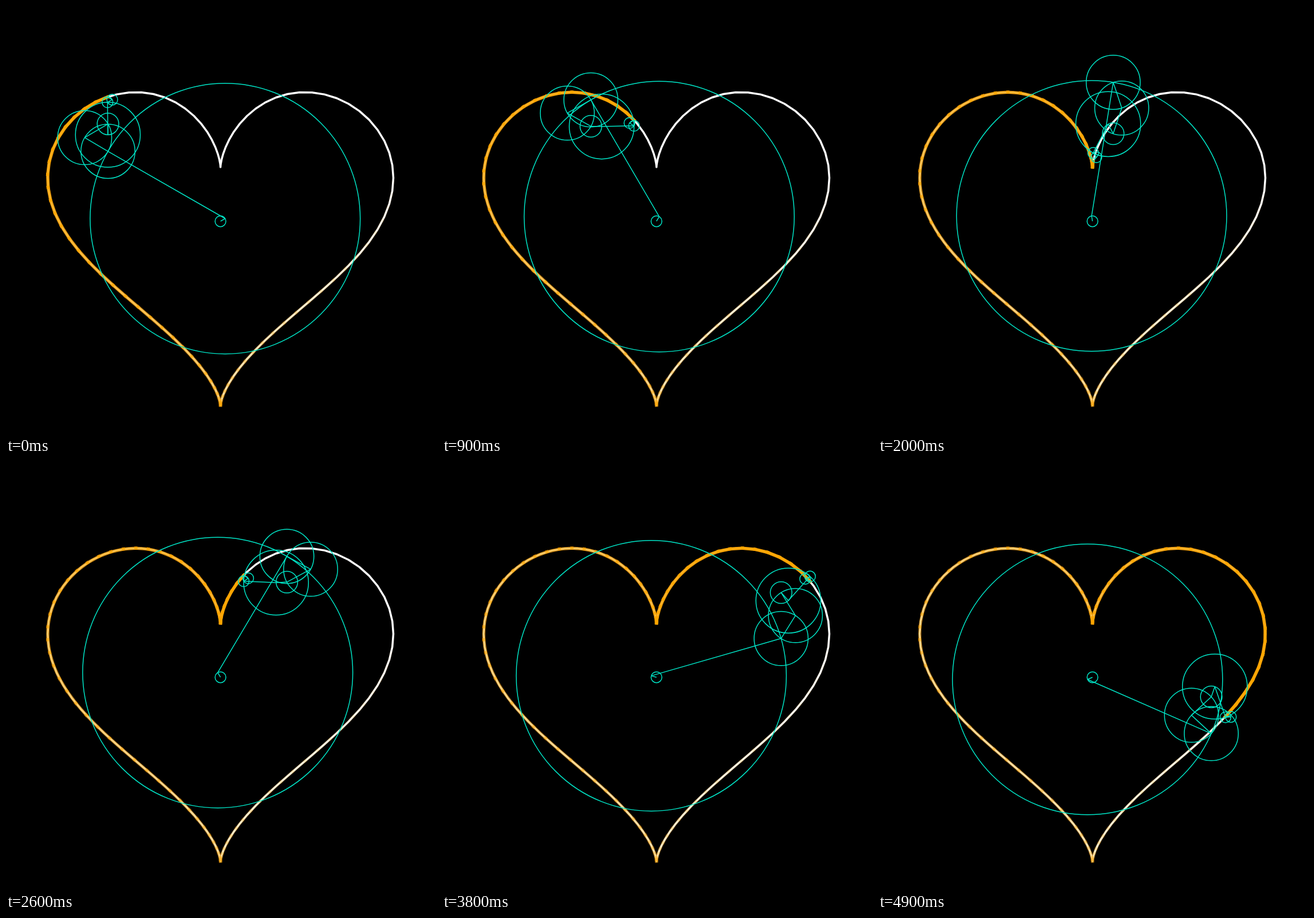
An HTML page with a canvas that plays this animation: 751x746 px, repeating every 5 s.

```html
<!DOCTYPE html>
<html lang="en">
<head>
<meta charset="utf-8">
<title>Heart drawn by epicycles</title>
<style>
html, body { margin: 0; width: 100%; height: 100%; overflow: hidden; background: #000; }
canvas { display: block; }
</style>
</head>
<body>
<canvas id="stage" width="751" height="746"></canvas>
<script>
const ctx = document.getElementById('stage').getContext('2d');
const CX = 374.6, CY = 375.2, UNIT = 18.87;
const LOOP = 5000, TICK = 100;
const STEP = 3.6, FIRST = -60.2, OFFSET = -62.8, TRAIL_START = 90;
const rad = d => d * Math.PI / 180;

// x = 12 sin t - 4 sin 3t,  y = 13 cos t - 5 cos 2t - 2 cos 3t - cos 4t
const SIN = [12, 0, -4, 0], COS = [13, -5, -2, -1];

// Each harmonic is a backward and a forward turning arm
function armTips(deg) {
  let x = CX, y = CY;
  const tips = [];
  SIN.forEach((a, i) => {
    const angle = rad((i + 1) * deg), b = COS[i];
    for (const dir of [-1, 1]) {
      const r = (b + dir * a) / 2 * UNIT;
      x += dir * r * Math.sin(angle);
      y -= r * Math.cos(angle);
      tips.push({ x, y, r: Math.abs(r) });
    }
  });
  return tips;
}

function heart(deg) {
  const pen = armTips(deg).pop();
  return [pen.x, pen.y];
}

function drawOutline() {
  ctx.strokeStyle = '#fff';
  ctx.lineWidth = 3.5;
  ctx.lineJoin = 'round';
  ctx.beginPath();
  for (let d = 0; d < 360; d += STEP) ctx.lineTo(...heart(d));
  ctx.closePath();
  ctx.stroke();
}

// Separate overlapping segments, fading towards the start of the trail
function drawTrail(angle) {
  const pen = angle + 360, length = pen - TRAIL_START;
  ctx.strokeStyle = '#ffa500';
  ctx.lineWidth = 5.6;
  ctx.lineCap = 'square';
  for (let n = Math.floor(length / STEP); n > 0; n--) {
    const d = pen - n * STEP;
    ctx.globalAlpha = (d + STEP - TRAIL_START) / length;
    ctx.beginPath();
    ctx.moveTo(...heart(d));
    ctx.lineTo(...heart(d + STEP));
    ctx.stroke();
  }
  ctx.globalAlpha = 1;
  ctx.lineCap = 'butt';
}

function drawArms(angle) {
  let x = CX, y = CY;
  ctx.strokeStyle = '#00e4c6';
  ctx.lineWidth = 1.5;
  for (const tip of armTips(angle)) {
    ctx.beginPath();
    ctx.arc(x, y, tip.r, 0, 2 * Math.PI);
    ctx.moveTo(x, y);
    ctx.lineTo(tip.x, tip.y);
    ctx.stroke();
    ({ x, y } = tip);
  }
}

function draw() {
  const tick = Math.floor(performance.now() % LOOP / TICK);
  const angle = Math.max(FIRST, OFFSET + STEP * tick);
  ctx.fillStyle = '#000';
  ctx.fillRect(0, 0, 751, 746);
  drawOutline();
  drawTrail(angle);
  drawArms(angle);
  requestAnimationFrame(draw);
}
draw();
</script>
</body>
</html>
```
